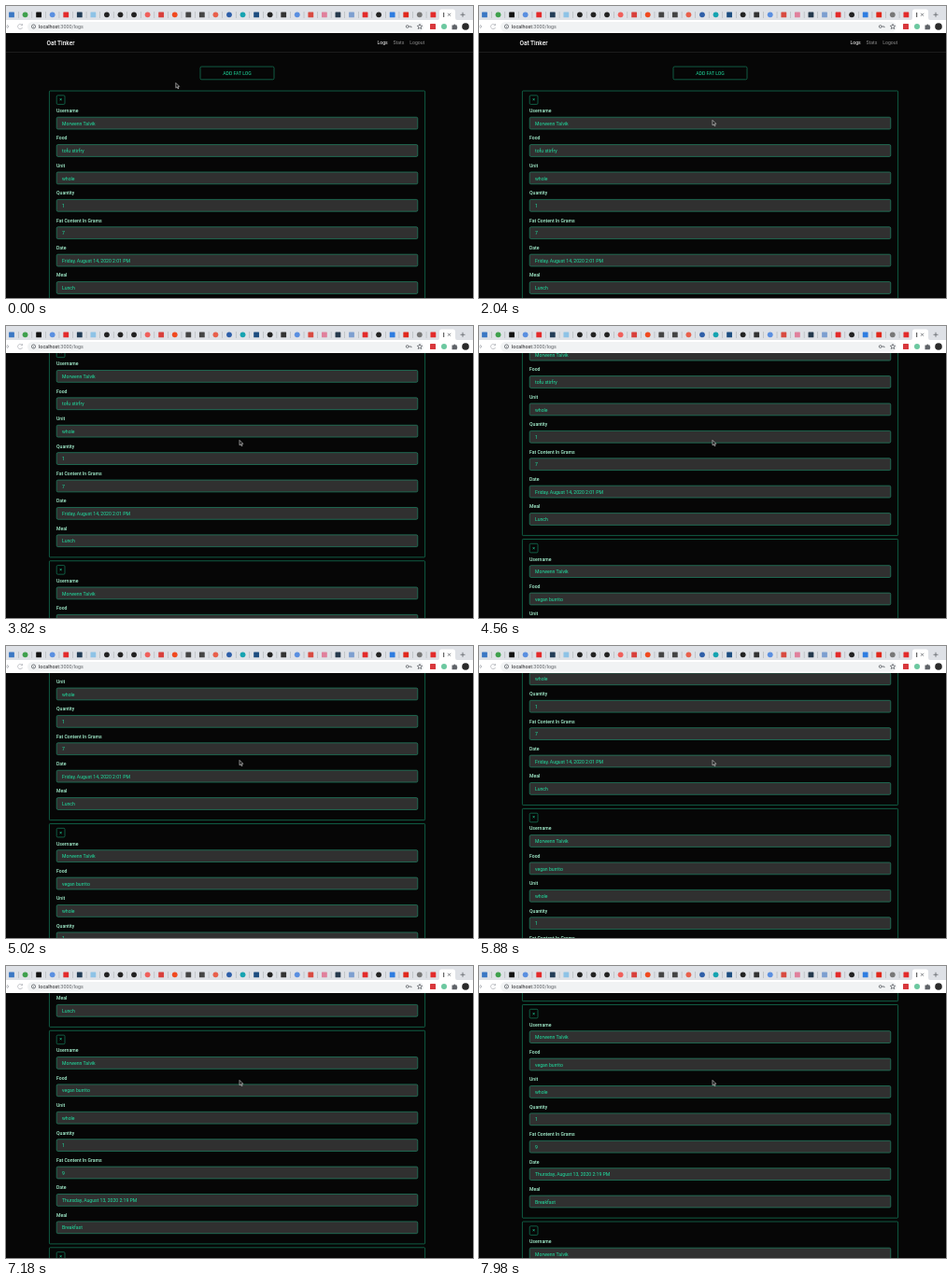
An HTML page for the animation above (8000 ms loop, 500 px wide and 313 px high).

```html
<!DOCTYPE html>
<html lang="en">
<head>
<meta charset="utf-8">
<title>Logs</title>
<style>
  html, body { margin: 0; width: 100%; height: 100%; overflow: hidden; background: #060606; }
  svg { display: block; width: 500px; height: 313px; font: 5.13px Roboto, Arial, sans-serif; }
  .line { fill: none; stroke: #178a64; stroke-width: .65; }
  .field { fill: #303030; stroke: #21906c; stroke-width: .65; }
  .label { fill: #a9f7d4; font-weight: 500; }
  .value { fill: #1fe3a3; }
  .icon { fill: none; stroke: #5f6368; stroke-width: .8; }
  .faint { stroke: #b4b7bb; }
</style>
</head>
<body>
<svg viewBox="0 0 500 313">
  <rect width="500" height="313" fill="#060606"/>
  <g id="page"></g>
  <g id="browser"></g>
  <path id="cursor" d="M0 0V5.4L1.3 4.3L2.2 6.3L3.1 5.9L2.2 3.900H3.900Z" fill="#111" stroke="#ddd" stroke-width=".6"/>
</svg>
<script>
const $ = id => document.getElementById(id);
const rect = (x, y, w, h, attrs) => `<rect x="${x}" y="${y}" width="${w}" height="${h}" ${attrs}/>`;
const text = (x, mid, str, attrs) => `<text x="${x}" y="${mid + 1.85}" ${attrs}>${str}</text>`;

// Page
const labels = ['Username', 'Food', 'Unit', 'Quantity', 'Fat Content In Grams', 'Date', 'Meal'];
const user = 'Morwenn Talvik';
const logs = [
  [user, 'tofu stirfry', 'whole', 1, 7, 'Friday, August 14, 2020 2:01 PM', 'Lunch'],
  [user, 'vegan burrito', 'whole', 1, 9, 'Thursday, August 13, 2020 2:19 PM', 'Breakfast'],
  [user, '', '', '', '', '', ''],
];

function card(values, i) {
  const top = 91 + 232.5 * i;
  const rows = labels.map((label, r) => {
    const y = top + 21.2 + 29.4 * r;
    return text(54, y, label, 'class="label"')
      + rect(54.2, y + 7, 386.6, 12.8, 'rx="1.4" class="field"')
      + text(60, y + 13.7, values[r], 'class="value"');
  });
  return rect(46.4, top, 402.2, 228.6, 'rx=".8" class="line"')
    + rect(54.2, top + 4.8, 8.8, 9.6, 'rx="1.2" class="line"')
    + text(58.6, top + 9.2, '×', 'class="value" text-anchor="middle"')
    + rows.join('');
}

$('page').innerHTML =
  rect(0, 49, 500, .7, 'fill="#262626"')
  + text(43.5, 39.7, 'Oat Tinker', 'fill="#fff" font-size="6.5" font-weight="500"')
  + text(397.5, 39.3, 'Logs', 'fill="#fff"')
  + text(414.5, 39.3, 'Stats', 'fill="#8c8c8c"')
  + text(432.3, 39.3, 'Logout', 'fill="#8c8c8c"')
  + rect(208, 65, 79, 13.8, 'rx="1.4" class="line"')
  + text(247.5, 71.8, 'ADD FAT LOG', 'class="value" text-anchor="middle"')
  + logs.map(card).join('');

// Browser window: s = square icon, c = round icon
const tabs = ('s#3b78c4 c#3fa04d s#111 c#5a8fe0 s#e32b2b s#233d57 s#8ec3e6 c#222 c#222 c#222 c#f0605c ' +
  's#d8403c c#f04a20 s#444 s#444 c#e8604c c#2f5fa8 c#16a3b0 s#1d4d80 c#222 s#333 c#5a8fe0 s#d84a40 ' +
  's#e0809c s#24384c s#7d9fd0 s#e32b2b c#222 s#2f7de0 s#e0281c c#777 s#e32b2b').split(' ');

function tab(spec, i) {
  const x = 6 + 14.56 * i, fill = `fill="${spec.slice(1)}"`;
  return rect(x - 2.9, 6.4, 5.8, 5.8, `rx="${spec[0] == 'c' ? 2.9 : .5}" ${fill}`)
    + (i < 31 ? rect(x + 7, 6, .5, 7, 'fill="#a4a8ad"') : '');
}

$('browser').innerHTML =
  rect(0, 0, 500, 29, 'fill="#dee1e6"')
  + rect(0, 15, 500, 14, 'fill="#fff"')
  + '<path d="M462 15Q464 15 464 12.5V6Q464 3.5 466 3.5H479Q481 3.5 481 6V12.5Q481 15 483 15Z" fill="#fff"/>'
  + tabs.map(tab).join('')
  + rect(468.2, 7, 1, 5, 'fill="#444"')
  + rect(23, 17, 424, 10.4, 'rx="5.2" fill="#f1f3f4"')
  + '<path class="icon" d="M473 7.8l3 3m0-3l-3 3M486.5 9.3h5m-2.5-2.5v5"/>'
  + '<path class="icon faint" d="M0 22h3m-2-2l2 2l-2 2M17.3 20.5a2.6 2.6 0 1 0 .3 2.5M17.5 19v1.8h-1.8"/>'
  + '<circle class="icon" cx="29.5" cy="22" r="2.1"/>' + rect(29.2, 21.6, .6, 1.6, 'fill="#5f6368"')
  + text(35, 22, 'localhost<tspan fill="#5f6368">:3000/logs</tspan>', 'fill="#202124" font-size="5.4"')
  + '<path class="icon" d="M431 22h3v1.2"/><circle class="icon" cx="429.7" cy="22" r="1.4"/>'
  + '<path class="icon" d="M443 19.4l.8 1.7 1.9.2-1.4 1.3.4 1.9-1.7-1-1.7 1 .4-1.9-1.4-1.3 1.9-.2z"/>'
  + rect(454, 19, 6, 6, 'rx=".6" fill="#d8383c"')
  + rect(466, 19, 6, 6, 'rx="3" fill="#6cc8a0"')
  + '<path d="M477.5 20.5h1.8a1 1 0 0 1 2 0h1.5v1.7a1 1 0 0 1 0 1.8v1.2h-5.3z" fill="#5f6368"/>'
  + '<circle cx="492" cy="22" r="3.8" fill="#2a2a2a"/>';

// Motion
const clamp = u => Math.min(1, Math.max(0, u));
// Each flick of the wheel: start, end, distance
const flicks = [[2100, 3100, 31], [3180, 4560, 64], [4620, 5380, 54], [5880, 7980, 133]];
const scrollAt = t => flicks.reduce(
  (sum, [start, end, dist]) => sum + dist * (1 - (1 - clamp((t - start) / (end - start))) ** 1.62), 0);

function draw(now) {
  const t = now % 8000;
  const u = clamp(Math.floor((t - 10) / 70) / 7);
  const move = u * u * (3 - 2 * u);
  $('page').setAttribute('transform', `translate(0 ${-scrollAt(t)})`);
  $('cursor').setAttribute('transform', `translate(${181.8 + 68.2 * move} ${82.4 + 40 * move})`);
  requestAnimationFrame(draw);
}
draw(0);
</script>
</body>
</html>
```
